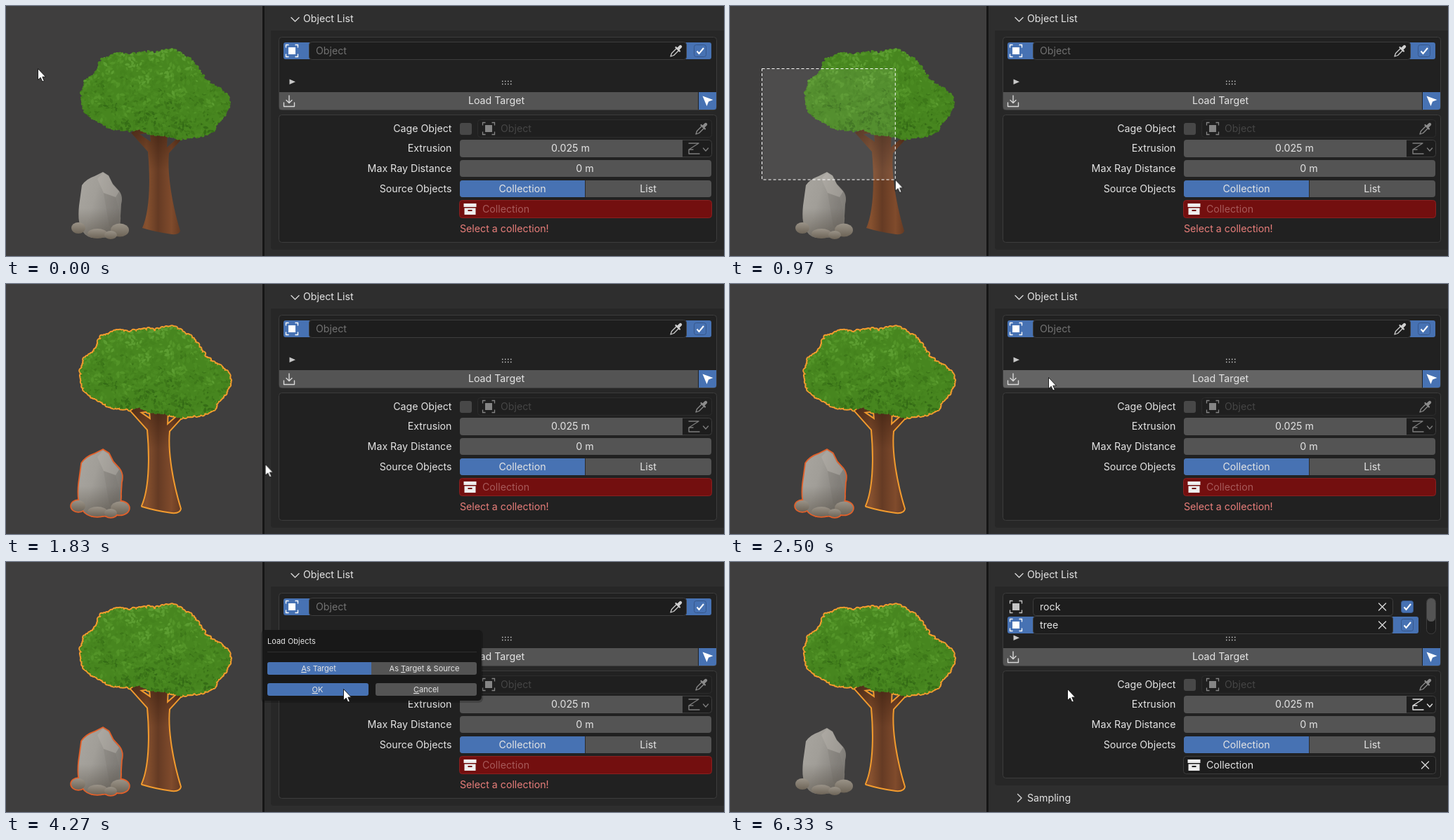
These frames come from a looping animation (1022 by 357 pixels, 6.56 s). An HTML page:

```html
<!DOCTYPE html>
<html lang="en">
<head>
<meta charset="utf-8">
<title>Load objects</title>
<style>
html, body { margin: 0; width: 100%; height: 100%; overflow: hidden; background: #2e2e2e; }
svg { display: block; }
text { font: 14.2px Inter, "Noto Sans", sans-serif; fill: #e4e4e4; }
.mid { text-anchor: middle; }
.end { text-anchor: end; }
.small text { font-size: 11px; }
.small tspan { text-decoration: underline; }
.line { fill: none; stroke: #d8d8d8; stroke-width: 1.4; stroke-linecap: round; stroke-linejoin: round; }
.btn { fill: #545454; }
.on { fill: #4772b3; }
.field { fill: #1d1d1d; stroke: #3d3d3d; }
.box { fill: #212121; stroke: #3c3c3c; }

/* Hard state changes */
.drag, .picked, .rockpick, .hover, .press, .dialog, .before, .after { animation: 6.56s step-end infinite; }
.drag { animation-name: drag; }
.picked { animation-name: picked; }
.rockpick { animation-name: rockpick; }
.hover { animation-name: hover; }
.press { animation-name: press; }
.dialog { animation-name: dialog; }
.before { animation-name: before; }
.after { animation-name: after; }
@keyframes drag { 0% { visibility: hidden } 3.5% { visibility: visible } 21.65%, 100% { visibility: hidden } }
@keyframes picked { 0% { visibility: hidden } 21.65%, 100% { visibility: visible } }
@keyframes rockpick { 0% { visibility: hidden } 21.65% { visibility: visible } 68.06%, 100% { visibility: hidden } }
@keyframes hover { 0% { visibility: hidden } 34.6% { visibility: visible } 45.2%, 100% { visibility: hidden } }
@keyframes press { 0% { visibility: hidden } 42.62% { visibility: visible } 45.2%, 100% { visibility: hidden } }
@keyframes dialog { 0% { visibility: hidden } 45.2% { visibility: visible } 68.06%, 100% { visibility: hidden } }
@keyframes before { 0% { visibility: visible } 68.06%, 100% { visibility: hidden } }
@keyframes after { 0% { visibility: hidden } 68.06%, 100% { visibility: visible } }

/* Pointer path and the rubber band that follows it */
.cursor { animation: move 6.56s cubic-bezier(.333, 0, .667, 1) infinite; }
.band { animation: grow 6.56s cubic-bezier(.333, 0, .667, 1) infinite; }
@keyframes move {
  0%, 3.5% { transform: translate(45px, 89px) }
  21.65% { transform: translate(324px, 322px) }
  37.5%, 50.9% { transform: translate(453px, 133px) }
  62.5%, 100% { transform: translate(480px, 181px) }
}
@keyframes grow {
  0%, 3.5% { width: 0; height: 0 }
  21.65%, 100% { width: 279px; height: 233px }
}
</style>
</head>
<body>
<svg width="1022" height="357" viewBox="0 0 1022 357">
<defs>
  <linearGradient id="bark">
    <stop offset="0" stop-color="#6b4029"/><stop offset=".3" stop-color="#87512f"/>
    <stop offset=".52" stop-color="#653b24"/><stop offset=".78" stop-color="#804b2c"/>
    <stop offset="1" stop-color="#5c3520"/>
  </linearGradient>
  <linearGradient id="shade" x2="0" y2="1">
    <stop offset="0" stop-color="#2b1509" stop-opacity=".5"/><stop offset=".4" stop-color="#2b1509" stop-opacity="0"/>
  </linearGradient>
  <linearGradient id="stone" x2="1" y2=".45">
    <stop offset="0" stop-color="#a9a6a0"/><stop offset=".45" stop-color="#a19e98"/><stop offset="1" stop-color="#7f7c77"/>
  </linearGradient>
  <linearGradient id="foot" x2="0" y2="1">
    <stop offset=".55" stop-color="#4d453a" stop-opacity="0"/><stop offset="1" stop-color="#4d453a" stop-opacity=".5"/>
  </linearGradient>
  <linearGradient id="pebble" x2="0" y2="1">
    <stop offset="0" stop-color="#9a9388"/><stop offset="1" stop-color="#6d6457"/>
  </linearGradient>

  <path id="crown"/>
  <clipPath id="crownClip"><use href="#crown"/></clipPath>
  <path id="trunk" fill-rule="evenodd" d="M194 317C204 295 206 252 202 208L178 181L186 176L205 175H230L229 202L246 187L252 188L232 210C229 240 237 285 248 321Q247 327 236 326Q214 323 194 317ZM190 183L205 181L206 194Z"/>
  <path id="boulder" d="M138 237L146 242L152 254L161 264Q167 272 164 283L163 300Q164 312 158 322Q152 331 138 331H122Q110 328 106 315Q102 305 104 285L108 256Q114 247 126 243Z"/>
  <g id="pebbles">
    <ellipse cx="103" cy="317" rx="10" ry="8"/><ellipse cx="162" cy="320" rx="13" ry="9.5"/>
    <ellipse cx="130" cy="325" rx="14" ry="7"/><ellipse cx="149" cy="327" rx="9" ry="6"/>
  </g>

  <g id="obj">
    <rect x="-5" y="-5" width="10" height="10" fill="currentColor"/>
    <path d="M-8.5-4.5V-8.5H-4.5M4.5-8.5H8.5V-4.5M8.5 4.5V8.5H4.5M-4.5 8.5H-8.5V4.5" fill="none" stroke="currentColor" stroke-width="1.3"/>
  </g>
  <g id="dropper" fill="none" stroke="currentColor" stroke-linecap="round" stroke-linejoin="round">
    <path d="M-8 8L-6.5 3.5L1-4L4-1L-3.5 6.5Z" stroke-width="1.3"/>
    <path d="M-.5-5L5 .5" stroke-width="2.2"/><path d="M3-3L6-6" stroke-width="4.4"/>
  </g>
  <path id="cross" class="line" d="M-5-5L5 5M5-5L-5 5"/>
  <g id="check">
    <rect x="-8.5" y="-8.5" width="17" height="17" rx="3" fill="#4772b3" stroke="#36578b"/>
    <path d="M-4.5 .5L-1.5 4L5-4" fill="none" stroke="#fff" stroke-width="2"/>
  </g>
  <path id="archive" fill="#eee" d="M-9-8H9V-3H-9ZM-8-1.5H8V8H-8ZM-3 1V3H3V1Z" fill-rule="evenodd"/>
  <g id="falloff" class="line" style="stroke: currentColor">
    <path d="M-7-8H7L-7 1H-1M-7 7H8M-7 1V7"/><path d="M13.500-1l3.500 4 3.500-4"/>
  </g>
</defs>

<!-- Viewport -->
<rect width="365" height="357" fill="#3f3e3e"/>
<g class="picked" fill="none" stroke="#f29b2e" stroke-width="4" stroke-linejoin="round">
  <use href="#trunk"/><use href="#crown"/>
</g>
<g class="rockpick" fill="none" stroke="#e2602a" stroke-width="3.600">
  <use href="#boulder"/><use href="#pebbles"/>
</g>
<use href="#trunk" fill="url(#bark)"/>
<use href="#trunk" fill="url(#shade)"/>
<use href="#crown" fill="#47861f"/>
<g id="leaves" clip-path="url(#crownClip)"></g>
<use href="#boulder" fill="url(#stone)"/>
<path d="M138 238L146 243L152 255L161 265L156 273L139 267L130 247Z" fill="#b5b2ac" opacity=".45"/>
<path d="M139 267L156 273L163 300L157 321L147 314Z" fill="#716e69" opacity=".22"/>
<use href="#boulder" fill="url(#foot)"/>
<use href="#pebbles" fill="url(#pebble)"/>
<g class="drag">
  <rect class="band" x="45.5" y="89.5" fill="#fff" fill-opacity=".07" stroke="#fff" stroke-dasharray="4 3"/>
</g>

<!-- Panel -->
<rect x="365" width="657" height="357" fill="#2e2e2e"/>
<rect x="365" width="3" height="357" fill="#161616"/>
<path class="line" d="M406 16.500l5.500 5.500 5.500-5.500"/>
<text x="423" y="23">Object List</text>
<path class="before" d="M377 35H1022V348H381Q377 348 377 344Z" fill="#272727"/>
<path class="after" d="M377 35H1022V319H381Q377 319 377 315Z" fill="#272727"/>
<rect class="box" x="388.500" y="44.500" width="623" height="104" rx="4"/>

<g class="before">
  <rect class="on" x="395" y="52" width="609" height="24" rx="3"/>
  <rect class="field" x="431.500" y="51.500" width="537" height="25" rx="4"/>
  <use href="#obj" x="407" y="64" color="#fff"/>
  <text x="441" y="69" style="fill: #727272">Object</text>
  <use href="#dropper" x="954" y="64" color="#d0d0d0"/>
  <use href="#check" x="988" y="64"/>
</g>
<g class="after">
  <rect class="on" x="395" y="78" width="585" height="24" rx="3"/>
  <rect class="field" x="431.500" y="51.500" width="512" height="25" rx="4"/>
  <rect class="field" x="431.500" y="77.500" width="512" height="25" rx="4"/>
  <use href="#obj" x="407" y="64" color="#c4c4c4"/><use href="#obj" x="407" y="90" color="#fff"/>
  <text x="441" y="69">rock</text><text x="441" y="95">tree</text>
  <use href="#cross" x="928.500" y="64"/><use href="#cross" x="928.500" y="90"/>
  <use href="#check" x="964" y="64"/><use href="#check" x="964" y="90"/>
  <rect class="field" x="991.500" y="51.500" width="13" height="51" rx="6"/>
  <rect class="btn" x="992" y="52" width="12" height="33" rx="5.500"/>
</g>

<path d="M403.500 104.500L412 108.300L403.500 112Z" fill="#c8c8c8"/>
<path d="M706 107.500H720M706 111.500H720" stroke="#c8c8c8" stroke-width="1.500" stroke-dasharray="1.500 2.500"/>
<path class="btn" d="M389 123H985V148H392Q389 148 389 145Z"/>
<path class="hover" d="M389 123H985V148H392Q389 148 389 145Z" fill="#646464"/>
<path class="press on" d="M389 123H985V148H392Q389 148 389 145Z"/>
<path class="line" d="M403 128V138M399 134.500L403 138.500L407 134.500M395.500 138V143.500H410.500V138"/>
<text class="mid" x="698" y="140">Load Target</text>
<path class="on" d="M986 123H1011V145Q1011 148 1008 148H986Z"/>
<path d="M991.500 128.500L1006.500 134L1000 136.500L997.500 143Z" fill="#fff"/>

<rect class="box before" x="388.500" y="155.500" width="623" height="182" rx="4"/>
<rect class="box after" x="388.500" y="155.500" width="623" height="153" rx="4"/>
<text class="end" x="634.500" y="180">Cage Object</text>
<text class="end" x="634.500" y="208">Extrusion</text>
<text class="end" x="634.500" y="237">Max Ray Distance</text>
<text class="end" x="634.500" y="266">Source Objects</text>

<rect x="646" y="167" width="17" height="17" rx="3" fill="#484848"/>
<rect x="671.500" y="162.500" width="333" height="25" rx="4" fill="#1f1f1f" stroke="#2d2d2d"/>
<use href="#obj" x="687" y="175" color="#858585"/>
<text x="704" y="180" style="fill: #454545">Object</text>
<use href="#dropper" x="990" y="175" color="#8c8c8c"/>

<rect class="field" x="945.500" y="191.500" width="59" height="24" rx="4"/>
<path class="btn" d="M650 191H963V216H650Q646 216 646 212V195Q646 191 650 191Z"/>
<text class="mid" x="803.500" y="208">0.025 m</text>
<use class="before" href="#falloff" x="979" y="204" color="#7c7c7c"/>
<use class="after" href="#falloff" x="979" y="204" color="#e4e4e4"/>
<rect class="btn" x="646" y="220" width="358" height="24" rx="4"/>
<text class="mid" x="824" y="237">0 m</text>
<rect class="btn" x="646" y="249" width="358" height="24" rx="4"/>
<path class="on" d="M650 249H824V273H650Q646 273 646 269V253Q646 249 650 249Z"/>
<path d="M824.500 249V273" stroke="#2c2c2c"/>
<text class="mid" x="735" y="266">Collection</text>
<text class="mid" x="914" y="266">List</text>

<g class="before">
  <rect x="645.500" y="277.500" width="359" height="25" rx="4" fill="#730f0f" stroke="#8a2020"/>
  <text x="678" y="295" style="fill: #a65a5a">Collection</text>
  <text x="646" y="323" style="fill: #e87e7a">Select a collection!</text>
</g>
<g class="after">
  <rect class="field" x="645.500" y="277.500" width="359" height="25" rx="4"/>
  <text x="678" y="295">Collection</text>
  <use href="#cross" x="989.500" y="290"/>
  <path class="line" d="M409.500 331.500l5.500 5.500-5.500 5.500"/>
  <text x="423" y="342">Sampling</text>
</g>
<use href="#archive" x="660.500" y="290"/>

<!-- Popup -->
<g class="dialog small">
  <rect x="363" y="97" width="316" height="104" rx="6" fill="#000" opacity=".2"/>
  <rect x="365" y="97" width="312" height="101" rx="5" fill="#181818"/>
  <text x="372" y="117">Load Objects</text>
  <path d="M372 128.500H670" stroke="#2f2f2f"/>
  <rect class="btn" x="372" y="143" width="298" height="18" rx="3"/>
  <path class="on" d="M375 143H520V161H375Q372 161 372 158V146Q372 143 375 143Z"/>
  <rect class="on" x="372" y="173" width="144" height="18" rx="3"/>
  <rect class="btn" x="526" y="173" width="144" height="18" rx="3"/>
  <text class="mid" x="445" y="156"><tspan>A</tspan>s Target</text>
  <text class="mid" x="595.500" y="156">As <tspan>T</tspan>arget &amp; Source</text>
  <text class="mid" x="443.500" y="186"><tspan>O</tspan>K</text>
  <text class="mid" x="598" y="186"><tspan>C</tspan>ancel</text>
</g>

<path class="cursor" d="M.5 .5V16.500L4.200 13.200L6.800 19L9.300 17.900L6.800 12.200H11.500Z" fill="#fff" stroke="#111" stroke-width=".9"/>
</svg>

<script>
let seed = 7;
const rnd = () => (seed = seed * 16807 % 2147483647) / 2147483647;

// Crown outline, clockwise from the left
const edge = [
  [108,121],[113,108],[120,103],[128,95],[133,85],[137,76],[150,71],[160,67],[175,70],[190,67],
  [205,66],[212,68],[225,64],[236,63],[247,66],[252,72],[262,75],[269,84],[275,92],[282,103],
  [292,111],[305,119],[315,128],[318,137],[315,146],[309,158],[300,167],[296,178],[283,184],[265,187],
  [247,189],[228,185],[215,184],[205,182],[190,176],[175,178],[160,176],[147,173],[135,165],[122,160],
  [112,150],[109,140]
];
const dot = (x, y, r) =>
  `M${(x - r).toFixed(1)} ${y.toFixed(1)}a${r} ${r} 0 1 1 ${2 * r} 0a${r} ${r} 0 1 1 ${-2 * r} 0`;

let crown = "M" + edge.join("L") + "Z";
edge.forEach(([x, y], i) => {
  const [u, v] = edge[(i + 1) % edge.length];
  const n = Math.ceil(Math.hypot(u - x, v - y) / 3.5);
  for (let k = 0; k < n; k++) {
    const p = k / n, r = +(1.2 + rnd() * 1.5).toFixed(1);
    crown += dot(x + (u - x) * p + rnd() * 2 - 1, y + (v - y) * p + rnd() * 2 - 1, r);
  }
});
document.getElementById("crown").setAttribute("d", crown);

// Leaves sorted into shades: lighter on top, in soft clumps
const shades = ["#356d16", "#3d7819", "#44821d", "#4b8b22", "#539428", "#5c9d31"];
const paths = shades.map(() => "");
for (let i = 0; i < 1500; i++) {
  const x = 105 + rnd() * 216, y = 60 + rnd() * 132, a = rnd() * 6.28, s = 2 + rnd() * 2.5;
  const clump = Math.sin(x * .11 + y * .05) * Math.cos(y * .13 - x * .04);
  const light = .5 + (122 - y) / 220 + .2 * clump + (rnd() - .5) * .45;
  const c = Math.cos(a) * s, d = Math.sin(a) * s;
  const at = (p, q) => `${(x + p).toFixed(1)} ${(y + q).toFixed(1)}`;
  const n = Math.max(0, Math.min(5, Math.floor(light * 6)));
  paths[n] += `M${at(-c, -d)}Q${at(-d, c)} ${at(c, d)}Q${at(d, -c)} ${at(-c, -d)}Z`;
}
document.getElementById("leaves").innerHTML =
  paths.map((d, i) => `<path d="${d}" fill="${shades[i]}"/>`).join("");
</script>
</body>
</html>
```
